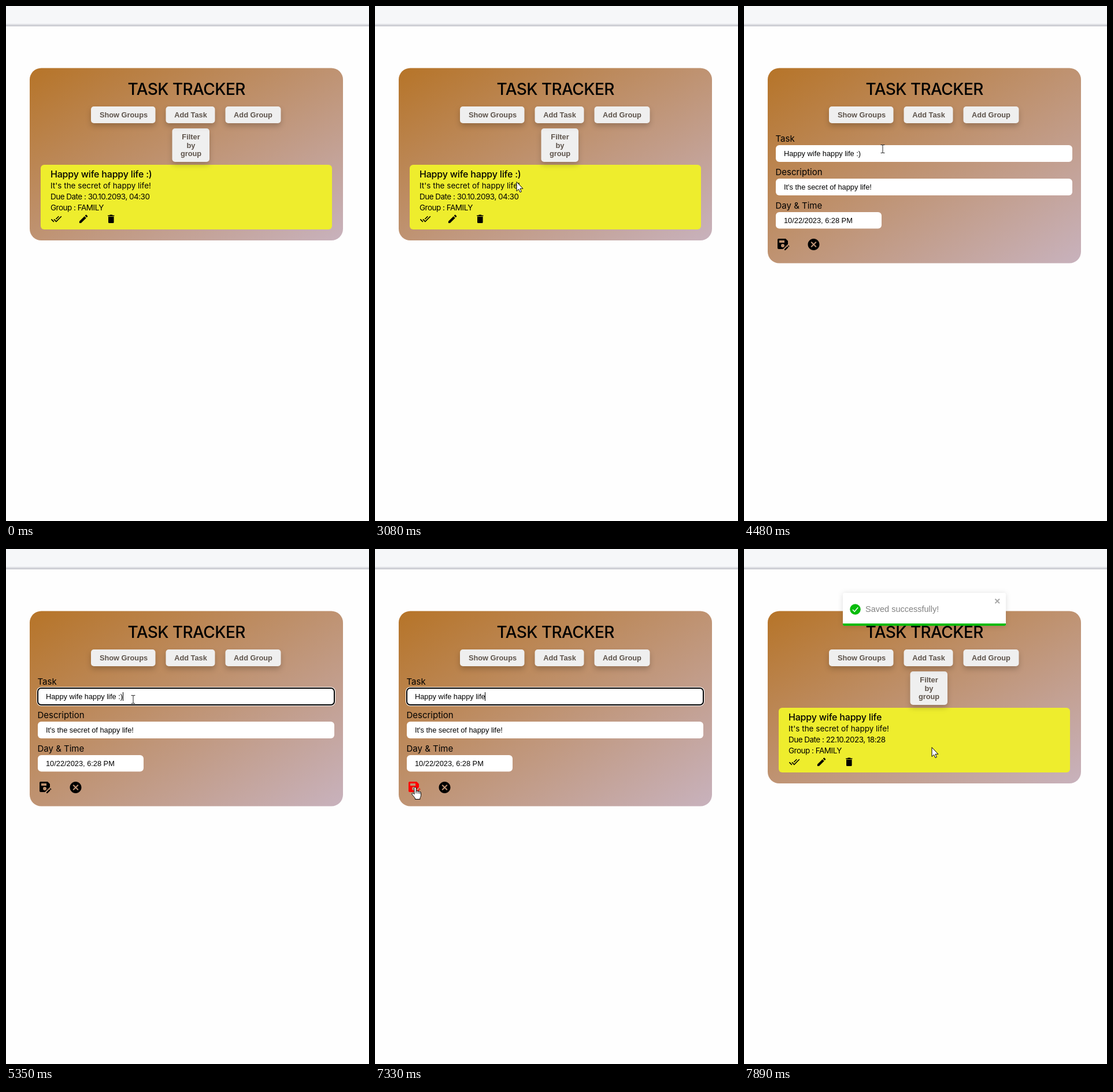
Animation of 628 by 892 pixels, one loop 8 s. Source, as an HTML page:

```html
<!DOCTYPE html>
<html lang="en">
<head>
<meta charset="utf-8">
<title>Task tracker</title>
<style>
html, body { margin: 0; width: 100%; height: 100%; overflow: hidden; background: #fefefe; }
svg { display: block; width: 628px; height: 892px; }
text { white-space: pre; }
.ui { font-family: Inter, "Open Sans", sans-serif; }
.field { font: 12.8px "Liberation Sans", Arial, sans-serif; }
.button text { font: bold 12.8px "Liberation Sans", Arial, sans-serif; fill: #5e544c; text-anchor: middle; }
.button rect { fill: #efefef; filter: drop-shadow(0 5px 5px rgba(0, 0, 0, .2)); }
.toast { font: 14.5px "Liberation Sans", Arial, sans-serif; fill: #828282; }
.panel { filter: drop-shadow(0 1px 5px rgba(0, 0, 0, .13)); }
.hot { fill: #f00; }
.off { display: none; }
</style>
</head>
<body>
<svg viewBox="0 0 628 892">
  <defs>
    <linearGradient id="warm" x1="0" y1="0" x2="1" y2="1">
      <stop offset="0" stop-color="#b67428"/>
      <stop offset="1" stop-color="#c8b2bd"/>
    </linearGradient>
  </defs>

  <rect width="628" height="31" fill="#f6f7f9"/>
  <rect y="31" width="628" height="3" fill="#dcdde2"/>
  <rect y="34" width="628" height="1" fill="#b3b3bb"/>

  <rect id="card" x="41" y="107.5" width="542" height="298.5" rx="20" fill="url(#warm)"/>
  <text class="ui" x="210.5" y="154" font-size="28" font-weight="500" letter-spacing="-.6">TASK TRACKER</text>

  <g id="list">
    <rect x="60" y="275" width="504" height="112" rx="6" fill="#eeed2d"/>
    <g class="ui" font-size="13.5">
      <text id="name" x="77" y="296.5" font-size="16" font-weight="500" letter-spacing="-.2"></text>
      <text x="77" y="316">It's the secret of happy life!</text>
      <text id="due" x="77" y="335" letter-spacing="-.52"></text>
      <text x="77" y="354" letter-spacing="-.5">Group : FAMILY</text>
    </g>
    <path transform="translate(77.5 359.2) scale(.8)" d="M18 7l-1.41-1.41-6.34 6.34 1.41 1.41L18 7zm4.24-1.41L11.66 16.17 7.48 12l-1.41 1.41L11.66 19l12-12-1.42-1.41zM.41 13.41L6 19l1.41-1.41L1.83 12 .41 13.41z"/>
    <path id="edit" transform="translate(124.5 359.2) scale(.8)" d="M3 17.25V21h3.75L17.81 9.94l-3.75-3.75L3 17.25zM20.71 7.04a1 1 0 0 0 0-1.41l-2.34-2.34a1 1 0 0 0-1.41 0l-1.83 1.83 3.75 3.75 1.83-1.83z"/>
    <path transform="translate(172.2 359.2) scale(.8)" d="M6 19c0 1.1.9 2 2 2h8c1.1 0 2-.9 2-2V7H6v12zM19 4h-3.5l-1-1h-5l-1 1H5v2h14V4z"/>
    <circle id="click" cx="132" cy="377" r="13" fill="#ff0" fill-opacity=".55"/>
    <g class="button">
      <rect x="287.5" y="212" width="64.5" height="58" rx="5"/>
      <text x="320" y="231">Filter</text>
      <text x="320" y="245.5">by</text>
      <text x="320" y="260">group</text>
    </g>
  </g>

  <g class="button">
    <rect x="147" y="174" width="111.5" height="29" rx="5"/>
    <text x="203.5" y="193">Show Groups</text>
    <rect x="276.5" y="174" width="85" height="29" rx="5"/>
    <text x="319.5" y="193">Add Task</text>
    <rect x="379.5" y="174" width="96" height="29" rx="5"/>
    <text x="427.5" y="193">Add Group</text>
  </g>

  <g id="form">
    <g class="ui" font-size="15">
      <text x="54.5" y="235">Task</text>
      <text x="54.5" y="293">Description</text>
      <text x="54.5" y="350.5">Day &amp; Time</text>
    </g>
    <g id="ring">
      <rect x="53" y="239" width="517" height="33" rx="8" fill="#fff"/>
      <rect x="54" y="240" width="515" height="31" rx="7"/>
    </g>
    <rect id="input" x="55" y="241" width="513" height="29" rx="6" fill="#fff"/>
    <rect x="55" y="299" width="513" height="29" rx="6" fill="#fff"/>
    <rect x="55" y="357" width="183" height="28.5" rx="6" fill="#fff"/>
    <g class="field">
      <text id="typed" x="69" y="260"></text>
      <text x="69" y="318">It's the secret of happy life!</text>
      <text x="69" y="375.5">10/22/2023, 6:28 PM</text>
    </g>
    <rect id="caret" y="248" width="1" height="15"/>
    <path id="save" fill-rule="evenodd" transform="translate(55 400)" d="M21 12.4V7l-4-4H5C3.89 3 3 3.9 3 5v14c0 1.1.89 2 2 2h7.4L21 12.4zM15 15a3 3 0 1 1-6 0 3 3 0 0 1 6 0zM6 6h9v4H6V6zM19.99 16.25l1.77 1.77L16.77 23H15v-1.77l4.99-4.98zM23.25 16.51l-.85.85-1.77-1.77.85-.85c.2-.2.51-.2.71 0l1.06 1.06c.2.2.2.52 0 .71z"/>
    <path transform="translate(108.5 401)" d="M12 2C6.47 2 2 6.47 2 12s4.47 10 10 10 10-4.47 10-10S17.53 2 12 2zm5 13.59L15.59 17 12 13.41 8.41 17 7 15.59 10.59 12 7 8.41 8.41 7 12 10.59 15.59 7 17 8.41 13.41 12 17 15.59z"/>
  </g>

  <g id="toast">
    <rect class="panel" x="171" y="76" width="282" height="57" rx="3" fill="#fff"/>
    <path d="M171 129h282v2q0 2-2 2H173q-2 0-2-2z" fill="#07bc0c"/>
    <circle cx="192.5" cy="104.5" r="9.3" fill="#07bc0c"/>
    <path d="M188 105l3.2 3.4 6-7.2" fill="none" stroke="#fff" stroke-width="1.5"/>
    <text class="toast" x="210" y="109">Saved successfully!</text>
    <path d="M434.5 86.5l7.5 7.5m0-7.5l-7.5 7.5" stroke="#a8a8a8" stroke-width="2"/>
  </g>

  <g id="cursor" stroke-linejoin="round" stroke-linecap="round">
    <path id="arrow" d="M0 0V15.5L3.6 12.2 6 17.6 8.4 16.6 6 11.3H10.6Z" fill="#fff" stroke="#000"/>
    <g id="hand" stroke="#000">
      <path d="M-1.7 1.5C-1.7-.5 1.7-.5 1.7 1.5V7C2.3 6 4.7 6.1 5 7.5 5.7 6.6 7.7 6.9 8 8.3 8.9 7.6 10 8.3 10 9.7V14C10 16.5 8.8 17.5 8.4 19V21H0V19.4C-1.2 17.5-4 14.5-5.4 12.5-6.2 11-4.8 9.6-3.3 10.6L-1.7 12Z" fill="#fff"/>
      <path d="M1.7 7v3.5M5 7.8v3M8 8.6v2.6" fill="none"/>
    </g>
    <path id="beam" d="M-3 -6.5H-1L0-5.8 1-6.5H3M0-5.8V6.8M-3 7.5H-1L0 6.8 1 7.5H3" fill="none" stroke="#222"/>
  </g>
</svg>
<script>
const LOOP = 8000;
const $ = id => document.getElementById(id);

// [time, cursor, x, y]
const moves = [
  [0, ''],
  [540, 'arrow', 540, 838],
  [820, 'arrow', 420, 640],
  [1120, 'arrow', 270, 470],
  [1400, 'arrow', 100, 385],
  [1680, 'beam', 173, 342],
  [1960, 'arrow', 258, 277],
  [2240, 'arrow', 300, 222],
  [2520, 'arrow', 290, 245],
  [2800, 'arrow', 272, 280],
  [3080, 'arrow', 245, 305],
  [3360, 'arrow', 210, 332],
  [3640, 'arrow', 165, 358],
  [3920, 'hand', 133, 375],
  [4200, 'hand', 131, 377.5],
  [4480, 'beam', 240, 247],
  [4760, 'beam', 231, 252],
  [5060, 'beam', 224, 257],
  [5340, 'beam', 220, 260],
  [5650, 'arrow', 215.5, 274],
  [6490, 'arrow', 214, 278],
  [6770, 'arrow', 160, 335],
  [7050, 'arrow', 100, 392],
  [7330, 'hand', 69.5, 412.5],
  [7610, 'arrow', 215, 375],
  [7890, 'arrow', 325, 344]
];

const full = 'Happy wife happy life :)';
// [time, letters left in the field]
const typing = [[0, 24], [5930, 23], [6210, 22], [6490, 21]];

const at = (table, t) => table.findLast(row => row[0] <= t);
const show = (id, on) => $(id).classList.toggle('off', !on);
const heat = (id, on) => $(id).classList.toggle('hot', on);
const put = (id, text) => { if ($(id).textContent !== text) $(id).textContent = text; };
const attr = (id, values) => {
  for (const key in values) $(id).setAttribute(key, values[key]);
};

function draw(t) {
  const editing = t >= 4480 && t < 7610;
  const saved = t >= 7610;
  const focus = t >= 5060 && editing;

  attr('card', { height: editing ? 338 : 298.5 });
  show('list', !editing);
  show('form', editing);
  show('toast', t >= 7890);
  show('click', t >= 4200 && t < 4480);
  show('ring', focus);
  show('caret', focus);
  heat('edit', t >= 3920 && t < 4480);
  heat('save', t >= 7330 && editing);

  put('name', saved ? full.slice(0, 21) : full);
  put('due', 'Due Date : ' + (saved ? '22.10.2023, 18:28' : '30.10.2093, 04:30'));
  put('typed', full.slice(0, at(typing, t)[1]));
  attr('input', focus
    ? { x: 56, y: 242, width: 511, height: 27, rx: 5 }
    : { x: 55, y: 241, width: 513, height: 29, rx: 6 });
  if (focus) attr('caret', { x: Math.floor(69 + $('typed').getComputedTextLength()) });

  const [, kind, x, y] = at(moves, t);
  for (const id of ['arrow', 'hand', 'beam']) show(id, id === kind);
  if (kind) attr('cursor', { transform: `translate(${x} ${y})` });
}

let start;
function tick(now) {
  start ??= now;
  draw((now - start) % LOOP);
  requestAnimationFrame(tick);
}
draw(0);
requestAnimationFrame(tick);
</script>
</body>
</html>
```
